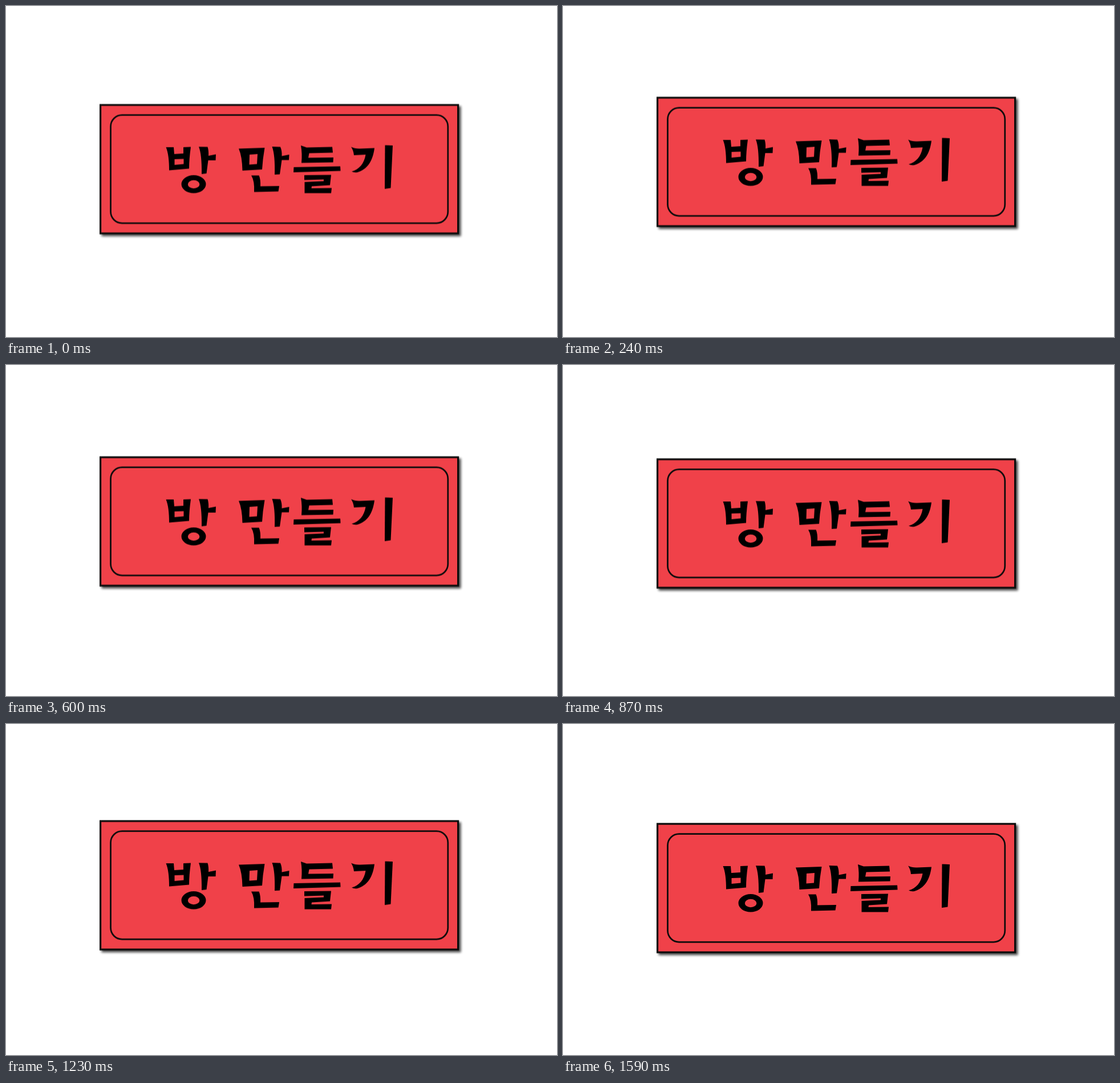
Write an HTML page that moves like this. It is 966 px wide and 580 px high and loops after 1830 ms.

```html
<!DOCTYPE html>
<html lang="ko">
<head>
<meta charset="utf-8">
<title>방 만들기</title>
<style>
  html, body { margin: 0; width: 100%; height: 100%; overflow: hidden; background: #fff; }
  svg { display: block; width: 966px; height: 580px; }
  .card { animation: hop 1830ms infinite; }
  .shadow { fill: #000; opacity: .72; filter: blur(2px); }
  .panel { fill: #f04149; stroke: #0b0b0b; stroke-width: 3.2px; }
  .frame { fill: none; stroke: #0b0b0b; stroke-width: 2.7px; }
  .label { fill: #000; fill-rule: evenodd; }

  /* quick rise for 300 ms, slow fall until 1590 ms, then rest; one step per 30 ms */
  @keyframes hop {
    0% { transform: translateY(-1.6px); animation-timing-function: steps(10, end); }
    16.3934% { transform: translateY(-17.5px); animation-timing-function: steps(43, end); }
    86.8852%, 100% { transform: translateY(0); }
  }
</style>
</head>
<body>
<svg viewBox="0 0 966 580" role="img" aria-label="방 만들기">
  <g class="card">
    <rect class="shadow" x="167.5" y="177" width="630" height="228"/>
    <rect class="panel" x="165.6" y="175" width="627" height="225"/>
    <rect class="frame" x="183.5" y="192.7" width="591.3" height="189.4" rx="20"/>
    <g class="label">
      <!-- 방 -->
      <path d="M280.5 249H294L295 261L311 260V249L324 248.5Q321 270 321 286.5L286 289.5Q286 262 280.5 249Z
               M295.5 270V280L311.5 278.5V269.5Z"/>
      <path d="M338 248.3L353.5 248.5Q355.5 255 355 264L368 261.5L367.5 272H354.5L351.5 295L343 296Q343.500 262 338 248.300Z"/>
      <path d="M307.500 313.800a21.500 15.700 0 1 0 43 0a21.500 15.700 0 1 0 -43 0Z
               M318.800 314a10.300 7.200 0 1 0 20.600 0a10.300 7.200 0 1 0 -20.600 0Z"/>
      <!-- 만 -->
      <path d="M408 251.5L453.5 250Q450 270 449 288L414.500 290Q414 265 408 251.5Z
               M427 262L441 261L440 278.500L426.500 279.500Z"/>
      <path d="M466.500 248L481 248.500Q484 255 483.500 264.500L496.500 262L496 271.500H483.500L480 296.500L471 297Q472 263 466.500 248Z"/>
      <path d="M430 298.500H443.500Q446.500 305 446 317.500L479 317L477.500 326.500L435 327.500Q436 308 430 298.500Z"/>
      <!-- 들 -->
      <path d="M517 246L527 249.500L572 248.500L573 258.500L531.500 259.500L530 267.500L574 267L573.500 275.500L518 276.500Q519.500 260 517 246Z"/>
      <path d="M504.500 284L586 282.500L586.500 290.500L504 293Z"/>
      <path d="M523 298L570 297.500L568 315.500L536 317.500L535.500 321L571 320.500L570 329.500H523.500V310L557 308.500V305.500L523 306.500Z"/>
      <!-- 기 -->
      <path d="M605 248.500Q612 252 621 251.500L646 250.500C643 274 633 288 616 293Q610 294 606 291.500C619 288 628 278 630.500 262L610 263Q609 254 605 248.500Z"/>
      <path d="M664.500 245.500L678 246L674.500 320.500L664 322Z"/>
    </g>
  </g>
</svg>
</body>
</html>
```
